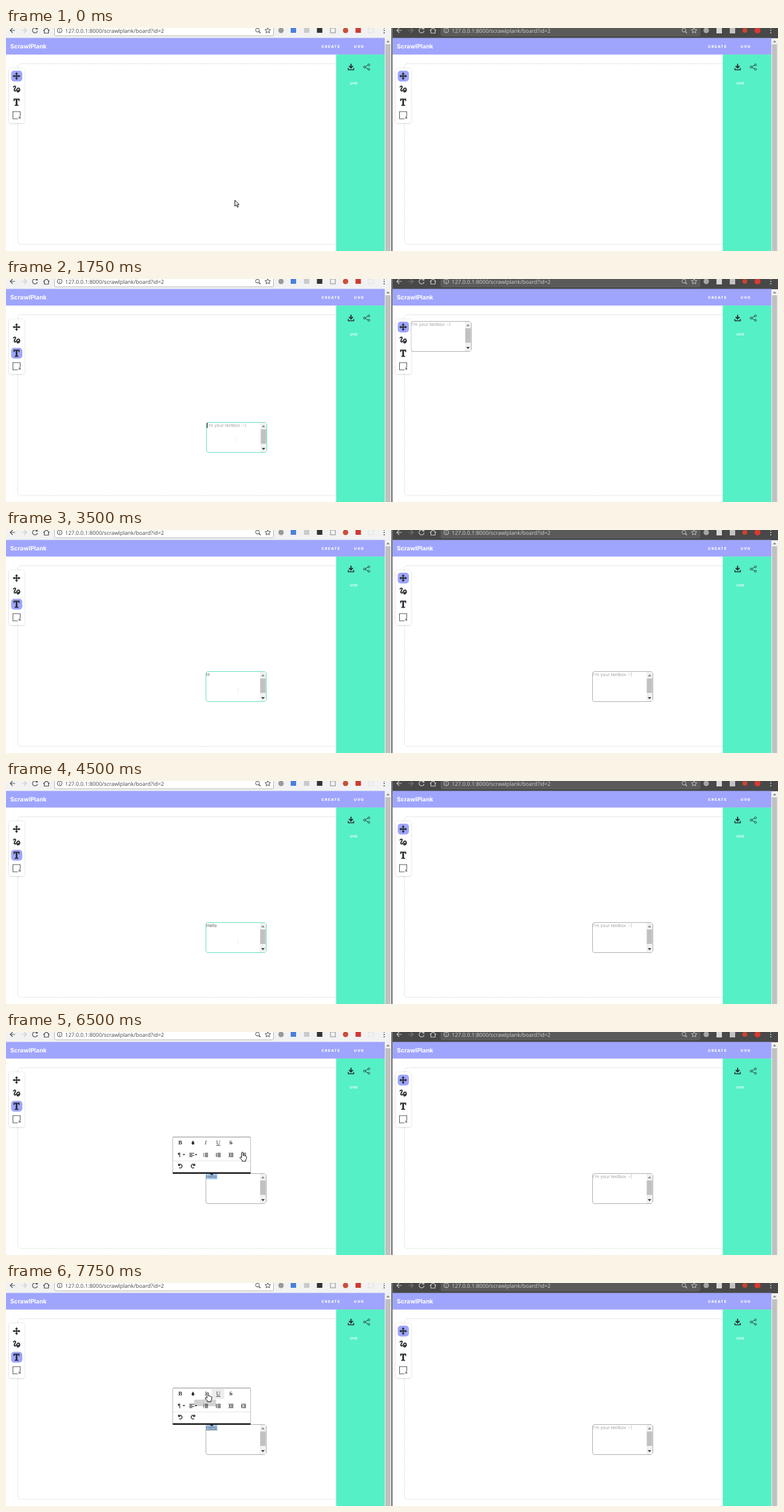
An HTML page for the animation above (8000 ms loop, 1280 by 371 pixels).

```html
<!DOCTYPE html>
<html lang="en">
<head>
<meta charset="utf-8">
<title>Shared whiteboard</title>
<style>
html, body { margin: 0; width: 100%; height: 100%; overflow: hidden; background: #fff; }
svg { display: block; width: 1280px; height: 371px; }
text { font-family: Inter, sans-serif; text-rendering: geometricPrecision; }
.url { font: 9px "Open Sans", sans-serif; }
.brand { font-size: 10px; font-weight: 700; fill: #fff; }
.nav { font-size: 6px; font-weight: 800; letter-spacing: 1.3px; fill: #fff; }
.note { font-size: 7.4px; font-weight: 300; }
.serif { font-family: "Liberation Serif", serif; font-size: 9.5px; text-anchor: middle; }
.tip { font: 5.4px "Liberation Sans", sans-serif; text-anchor: middle; fill: #fff; }
</style>
</head>
<body>
<svg id="stage" viewBox="0 0 1280 371"></svg>
<script>
const DX = 641, PURPLE = '#9fa5fd', MINT = '#55f0c5', INK = '#2b2e33';

const rect = (x, y, w, h, fill, more = '') =>
  `<rect x="${x}" y="${y}" width="${w}" height="${h}" fill="${fill}" ${more}/>`;
const dot = (x, y, r, fill, more = '') =>
  `<circle cx="${x}" cy="${y}" r="${r}" fill="${fill}" ${more}/>`;
const line = (d, color, w = 1, more = '') =>
  `<path d="${d}" fill="none" stroke="${color}" stroke-width="${w}" ${more}/>`;
const shape = (d, fill, more = '') => `<path d="${d}" fill="${fill}" ${more}/>`;
const text = (x, y, s, cls, more = '') => `<text x="${x}" y="${y}" class="${cls}" ${more}>${s}</text>`;
const at = (x, y, body, turn = '') => `<g transform="translate(${x} ${y}) ${turn}">${body}</g>`;

function browserBar(dark) {
  const ink = dark ? '#c4c4c4' : '#505050', dim = dark ? '#777' : '#ccc';
  const end = dark ? 509 : 443;
  const arrow = line('M4 0H-4M0-4L-4 0L0 4', ink, 1.2);
  let s = rect(0, 0, 639, 17, dark ? '#484848' : '#f2f2f2')
    + rect(80.5, -8, end - 80, 21, dark ? '#5a5a5a' : '#fff', `rx="2" stroke="${dark ? '#666' : '#b5b5b5'}"`)
    + at(11, 4, arrow)
    + at(30, 4, arrow.replace(ink, dim), 'scale(-1 1)')
    + at(48, 4, line('M3.5-2.5A4.2 4.2 0 1 0 4.2 1M4-5V-2H1', ink, 1.2))
    + at(67, 4, line('M-5 .5L0-4.5L5 .5M-3.5-.5V4.5H3.5V-.5', ink, 1.2))
    + at(89, 4, dot(0, 0, 4, 'none', `stroke="${ink}"`) + line('M0-2.4V-1.2M0-.4V2.5', ink))
    + text(98, 7.6, '127.0.0.1:8000/scrawlplank/board?id=2', 'url', `fill="${dark ? '#d0d0d0' : '#444'}"`)
    + at(end - 26, 4, dot(0, -.5, 3.2, 'none', `stroke="${ink}"`) + line('M2.2 1.8L5 4.6', ink, 1.4))
    + at(end - 9, 4, line('M0-4.5L1.3-1.4L4.6-1.2L2.1 1L2.9 4.2L0 2.4L-2.9 4.2L-2.1 1L-4.6-1.2L-1.3-1.4Z', ink));
  if (dark) {
    s += dot(520, 4, 4.5, '#a5a5a5') + rect(537, 0, 9, 9, '#d8d8d8') + rect(559, 0, 9, 9, '#c2c2c2')
      + dot(584, 4, 4, '#c8452f') + dot(605, 4, 5, '#d93a33');
  } else {
    s += dot(456, 4, 4.5, '#9a9a9a') + rect(472, -1, 9, 9, '#4a80dc') + rect(494, -1, 9, 9, '#cacaca')
      + rect(515.5, 0, 9, 8, '#333') + rect(538, 0, 8, 8, 'none', 'stroke="#888"') + dot(563, 4, 4.5, '#c8503a')
      + rect(579.5, -1, 9, 9, '#cf3a30') + rect(601, 0, 8, 8, 'none', 'stroke="#d8d8d8" stroke-dasharray="2 1"');
  }
  return s + [0, 4, 8].map(y => dot(627, y, 1.1, ink)).join('');
}

const icons = [
  line('M-4.5 0H4.5M0-4.5V4.5', INK, 1.9)
    + shape('M0-6.5l2.6 3.2h-5.2zM0 6.5l2.6-3.2h-5.2zM6.5 0l-3.2 2.6v-5.2zM-6.5 0l3.2 2.6v-5.2z', INK),
  line('M-5.5-3C-4-6-1-5.5-1.8-3L-3.6.5C-4.5 3-2 3.8-.5 2C1-1 3-2.8 4.6-1S4.4 5 2 4.6S1.5 1 6 2.2', INK, 1.9),
  shape('M-5-6H5v4H3.5l-.8-2H1.4V4l1.8.6V6h-6.4V4.6L-1.4 4v-8h-1.3l-.8 2H-5z', INK),
  rect(-6, -6, 12, 12, 'none', 'stroke="#444" stroke-width=".9"')
    + rect(2, 2, 5, 5, '#fff') + line('M3 6L6 3M3.2 3H6V6', '#444', .9),
];

function page() {
  return rect(0, 16.5, 628, 27.7, PURPLE)
    + text(7, 33.5, 'ScrawlPlank', 'brand')
    + text(523, 33, 'CREATE', 'nav') + text(577, 33, 'UVO', 'nav')
    + rect(19.5, 59.5, 560, 300.5, '#fff', 'rx="5" stroke="#dcdce2" stroke-dasharray="2 1"');
}

function sidePanel() {
  return rect(547.5, 44.2, 80.5, 327, MINT, 'filter="url(#glow)"')
    + at(572, 65, line('M0-5.5V1M-3.2-1.8L0 1.4L3.2-1.8', INK, 1.9) + line('M-4.5 1.5V4.5H4.5V1.5', INK, 1.5))
    + at(598, 65, line('M3.5-3.7L-3.5 0L3.5 3.7', INK, .9)
      + [[-3.6, 0], [3.6, -3.7], [3.6, 3.7]].map(p => dot(...p, 1.6, MINT, `stroke="${INK}" stroke-width=".9"`)).join(''))
    + text(570, 93.7, 'uvo', 'note', 'fill="#fff" style="font-weight:500"')
    + rect(628, 17, 11, 354, '#f1f1f1') + rect(629, 27, 8.5, 344, '#c1c1c1')
    + shape('M633.3 20.5l2.8 3.5h-5.6z', '#888');
}

function tools(active) {
  return rect(5, 67, 25.5, 91, '#fff', 'rx="4" filter="url(#soft)"')
    + rect(8.5, active ? 114.5 : 71, 18.5, 18, PURPLE, 'rx="5"')
    + icons.map((icon, i) => at(17.5, 80 + i * 21.7, icon)).join('');
}

function textbox({ x, y, label = '', hint, focus, caret, picked, under }) {
  return at(x, y,
    rect(.5, .5, 100, 50, '#fff', `rx="3.5" stroke="${focus ? '#66dfc4' : '#b0b0b0'}"`)
    + rect(90, 1, 10, 49, '#f1f1f1') + rect(90.5, 12, 9, 24, '#c1c1c1')
    + shape('M95 5l2.8 3.5h-5.6z', '#888') + shape('M95 46.5l3-3.5h-6z', '#444')
    + (picked ? rect(1, 1, 18.5, 9, '#a9cdf5') : '')
    + text(1, 8.4, hint ? "I'm your textbox :-)" : label, 'note', `fill="${hint ? '#888' : '#333'}"`)
    + (under ? line('M1 9.5H19', '#333', .7) : '')
    + (caret ? line('M1.5 1V10', '#111') : ''));
}

const caretDown = x => shape(`M${x} 29h4l-2 2.5z`, INK);
const bars = (x, widths) => widths.map((w, i) => rect(x, 27.2 + i * 1.9, w, 1, INK)).join('');
const list = (x, w) => bars(x - 1.5, [5.5, 5.5, 5.5, 5.5])
  + rect(x - 4, 27.2, w, 6.7, INK, 'opacity=".7"');
const indent = (x, flip) => bars(x - 4, [8, 0, 0, 8]) + rect(x, 29.1, 4, 1, INK) + rect(x, 31, 4, 1, INK)
  + shape(flip ? `M${x - 4} 28.8v3.6l3-1.8z` : `M${x - 1} 28.8v3.6l-3-1.8z`, INK);
const undo = line('M-2.4-1.8A3 3 0 1 1-2 2.5M-3-4V-1H0', INK, 1.3);

function popup({ x, y, hover, tip = 0 }) {
  const letter = (cx, s, more) => text(cx, 13.2, s, 'serif', `fill="${INK}" ${more}`);
  return at(x, y,
    rect(.5, .5, 129, 61, '#fff', 'rx="1.5" stroke="#bbb"') + rect(1, 0, 128, 1.4, '#aaa')
    + (hover ? rect(hover, 1.5, 21, 17.5, '#ececec') : '')
    + letter(13, 'B', 'font-weight="700"')
    + shape('M34 6.5c1 2 2.3 3 2.3 4.6a2.3 2.3 0 0 1-4.6 0c0-1.6 1.3-2.6 2.3-4.6z', INK)
    + letter(55, 'I', 'font-style="italic"')
    + letter(76, 'U', 'text-decoration="underline"')
    + letter(97, 'S', 'text-decoration="line-through"')
    + text(11, 33, '¶', 'serif', `fill="${INK}" font-weight="700"`) + caretDown(17)
    + bars(28, [8, 5, 8, 5]) + caretDown(37)
    + list(55, .9) + list(76, 1.5) + indent(97) + indent(118, true)
    + line('M1 40.5H129', '#e6e6e6')
    + at(13, 49, undo) + at(34, 49, undo, 'scale(-1 1)')
    + rect(.5, 59.3, 129, 2.7, '#222') + shape('M62 62h6l-3 2.5z', '#222')
    + (tip ? `<g opacity="${tip}">` + rect(36, 20, 36.5, 11, '#222', 'rx="1"') + shape('M52 20l2.5-2.5l2.5 2.5z', '#222')
      + (tip === 1 ? text(54, 27.4, 'Italic (Ctrl+I)', 'tip') : '') + '</g>' : ''));
}

const pointers = {
  arrow: shape('M.5.5V10.5L2.9 8.4L4.6 12.2L6.2 11.5L4.5 7.8H7.6Z', '#fff', 'stroke="#111"'),
  hand: shape('M-1.3 1.2C-1.3-.6 1.2-.6 1.2 1.2V5.5L2.6 5.3 4.2 6 5.7 6.3 6.7 7.3V10.5L5.3 13V15H-.5V13.5L-4 9.6C-4.7 8-3 7.3-1.3 9.2Z', '#fff', 'stroke="#111"'),
  beam: line('M0-5V5', '#ececec', 1),
  beamOnText: line('M0-4V4', '#a9cdf5', 2.2),
};

// Each row holds until the next one; the first column counts quarter seconds.
const pick = (rows, k) => rows.filter(r => r[0] <= k).pop().slice(1);

const pointerRows = [
  [0, 'arrow', 379, 286], [1, 'arrow', 268, 236], [2, 'arrow', 138, 178], [3, 'arrow', 40, 136],
  [4, 'arrow', 22, 122], [6, 'beam', 230, 180], [7, 'beam', 382, 267], [8, 'beam', 385, 268],
  [19, 'beamOnText', 342.4, 240.5], [25, 'arrow', 424, 214], [26, 'hand', 392, 200],
  [27, 'hand', 362, 188], [28, 'hand', 339, 177.5], [29, 'hand', 350, 181], [31, 'hand', 334.5, 182.5],
];
const boxRows = [[0], [5, 30, 70], [6, 180, 153], [7, 332, 238], [8, 331, 235]];
const farBoxRows = [[0], [5, 30, 70], [9, 331, 235]];
const labelRows = [[0, ''], [14, 'H'], [15, 'Hel'], [16, 'Hello']];
const popupRows = [[0], [10, 266, 164], [12], [19, 286, 174], [21], [25, 276, 174]];

function draw(k) {
  const [kind, px, py] = pick(pointerRows, k);
  const [bx, by] = pick(boxRows, k), [fx, fy] = pick(farBoxRows, k), [ex, ey] = pick(popupRows, k);
  const near = bx === undefined ? '' : textbox({
    x: bx, y: by, hint: k < 12, label: pick(labelRows, k)[0], focus: k >= 7 && k < 25,
    caret: k === 7 || k === 12, picked: k >= 19 && k !== 21, under: k >= 30,
  });
  const far = fx === undefined ? '' : textbox({ x: fx, y: fy, hint: true });
  const editor = ex === undefined ? '' : popup({
    x: ex, y: ey, hover: k >= 29 ? 65 : k === 28 ? 44 : 0, tip: k === 28 ? 1 : k === 31 ? .2 : 0,
  });
  const pane = (dark, tool, content) => browserBar(dark) + page() + sidePanel() + content + tools(tool);
  const shadow = (id, blur, opacity) => `<filter id="${id}" x="-30%" y="-30%" width="160%" height="160%">`
    + `<feDropShadow dx="0" dy=".5" stdDeviation="${blur}" flood-opacity="${opacity}"/></filter>`;

  stage.innerHTML = shadow('soft', 1.5, .22) + shadow('glow', 1, .12)
    + rect(0, 0, 1280, 371, '#fff')
    + pane(false, k >= 4, near) + editor
    + at(DX, 0, pane(true, false, far))
    + rect(639, 0, 1.6, 371, '#444')
    + at(px, py, pointers[kind]);
}

const stage = document.getElementById('stage');
let shown = -1;
function tick() {
  const k = Math.floor(performance.now() % 8000 / 250);
  if (k !== shown) draw(shown = k);
  requestAnimationFrame(tick);
}
tick();
</script>
</body>
</html>
```
